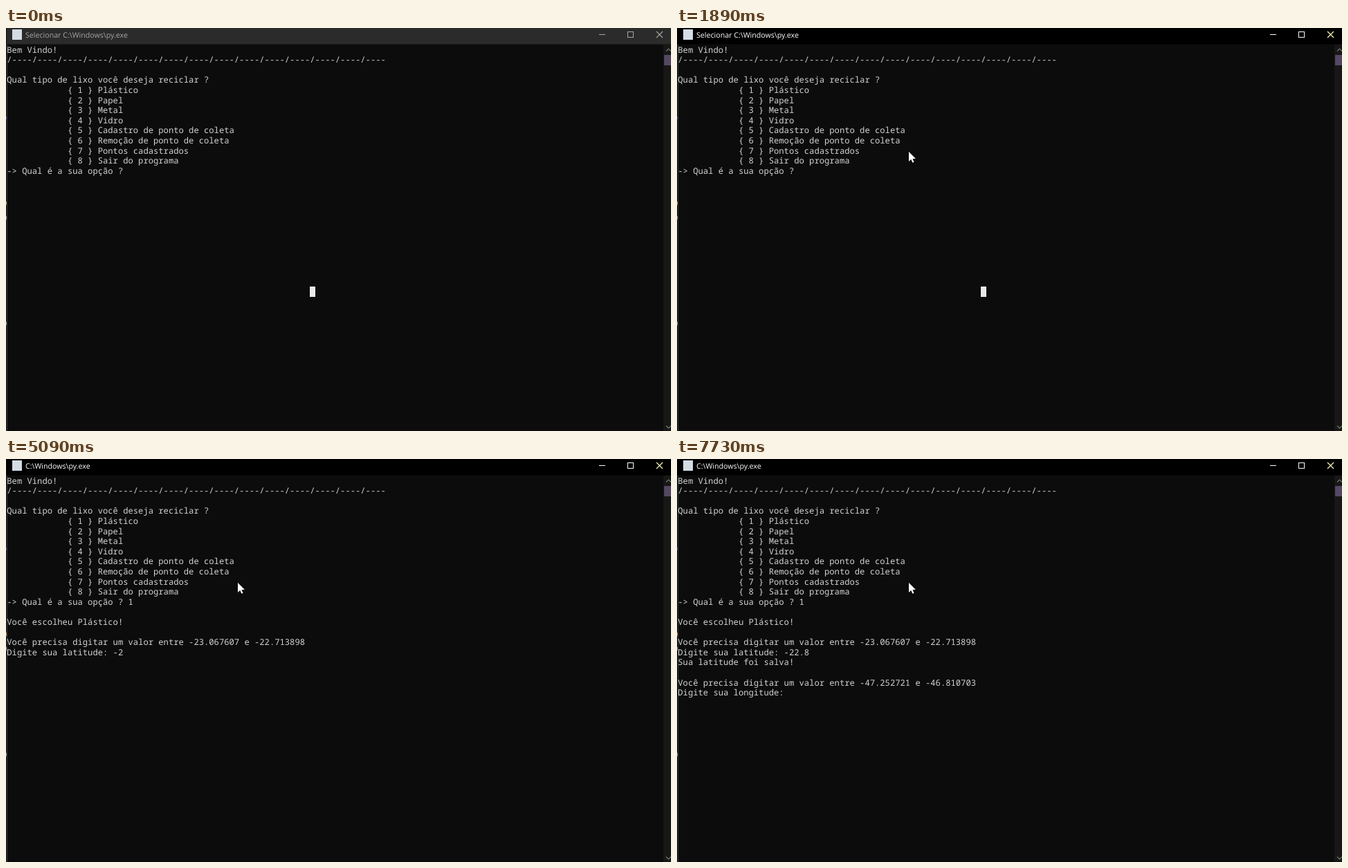
Recreate the animation shown at these times as an HTML page with a canvas. Size 961 by 583 pixels, loop 8000 ms.

```html
<!DOCTYPE html>
<html lang="pt">
<head>
<meta charset="utf-8">
<title>Console</title>
<style>
html, body { margin: 0; width: 100%; height: 100%; overflow: hidden; background: #0c0c0c; }
canvas { display: block; }
</style>
</head>
<body>
<canvas id="stage" width="961" height="583"></canvas>
<script>
const ctx = document.getElementById('stage').getContext('2d');
const LOOP = 8000, CW = 7.3, CH = 14.6;
const FOCUS = 820, BLINK = 532, BLINK_PHASE = 280;
const colX = c => 1.3 + c * CW, rowY = r => 24 + r * CH;
const tickCount = t => Math.floor((t - BLINK_PHASE) / BLINK);

const kinds = ['Plástico', 'Papel', 'Metal', 'Vidro', 'Cadastro de ponto de coleta',
  'Remoção de ponto de coleta', 'Pontos cadastrados', 'Sair do programa'];
const menu = ['Bem Vindo!', '/----'.repeat(15), '', 'Qual tipo de lixo você deseja reciclar ?',
  ...kinds.map((k, i) => ' '.repeat(12) + `{ ${i + 1} } ${k}`),
  '-> Qual é a sua opção ? '].join('\n');
const range = (a, b) => `Você precisa digitar um valor entre ${a} e ${b}\n`;

// What the program prints after each Enter
const replies = [
  '\nVocê escolheu Plástico!\n\n' + range('-23.067607', '-22.713898') + 'Digite sua latitude: ',
  'Sua latitude foi salva!\n\n' + range('-47.252721', '-46.810703') + 'Digite sua longitude: '
];
const keys = [[2690, '1'], [3240, '\n'], [4880, '-'], [5010, '2'], [5220, '2'],
  [5430, '.'], [6080, '8'], [6940, '\n']];

function screenRows(typed) {
  let entered = 0;
  return typed.reduce((s, [, ch]) => s + ch + (ch === '\n' ? replies[entered++] : ''), menu).split('\n');
}

// A key shows the caret at once; after Enter it skips one blink
function caretOn(t, [keyTime, ch] = [BLINK_PHASE, '']) {
  const flips = tickCount(t) - tickCount(keyTime) - (ch === '\n' ? 1 : 0);
  return t >= FOCUS && (flips <= 0 || flips % 2 === 0);
}

// Pointer position advances in discrete steps
const progress = (t, from, step, count) =>
  Math.max(0, Math.min(1, Math.floor((t - from) / step) / count));

function mouseAt(t) {
  const left = 1 - progress(t, 140, 68.75, 8);
  const move = progress(t, 1260, 90, 4);
  return [226 + 334 * left ** 1.5 + 109 * move, 222 + 280 * left ** 3 - 43 * move];
}

function rect(color, x, y, w, h) {
  ctx.fillStyle = color;
  ctx.fillRect(x, y, w, h);
}

function line(color, ...paths) {
  ctx.strokeStyle = color;
  ctx.lineWidth = 1.1;
  ctx.beginPath();
  for (const p of paths) p.forEach(([x, y], i) => i ? ctx.lineTo(x, y) : ctx.moveTo(x, y));
  ctx.stroke();
}

function titleBar(active, selecting) {
  const ink = active ? '#fff' : '#a6a6a6';
  rect(active ? '#000' : '#2b2b2b', 1, 0, 960, 23.5);
  rect('#d3dce2', 9, 2, 14, 15);
  ctx.font = '10.65px "Open Sans", "Noto Sans", sans-serif';
  ctx.fillStyle = ink;
  ctx.fillText((selecting ? 'Selecionar ' : '') + 'C:\\Windows\\py.exe', 28, 14);
  rect(ink, 857, 9, 9, 1);
  ctx.strokeStyle = ink;
  ctx.lineWidth = 1;
  ctx.strokeRect(898.5, 5.5, 8, 8);
  line(active ? '#ffffc4' : '#a6a69a', [[940, 5], [949, 14]], [[949, 5], [940, 14]]);
}

function windowEdges() {
  const chevron = (y, dy) => [[954, y], [957.5, y + dy], [961, y]];
  rect('#0f0f0f', 0, 24, 1, 559);
  rect('#393939', 1, 24, 1, 559);
  // slivers of the window behind
  rect('#4b3fa0', 0, 128, 1, 4);
  rect('#c98545', 0, 251, 1, 5);
  rect('#8c8499', 0, 272, 1, 5);
  rect('#6f9a94', 0, 425, 1, 5);
  rect('#171717', 950, 24, 11, 559);
  rect('#544862', 951, 39, 10, 15);
  line('#74806e', chevron(33.5, -3.5), chevron(575.5, 3.5));
}

function textRow(text, row) {
  const base = Math.round(rowY(row) + 11.5);
  [...text].forEach((ch, i) => { if (ch !== ' ') ctx.fillText(ch, colX(i), base); });
}

function pointer([x, y]) {
  ctx.fillStyle = '#fff';
  ctx.beginPath();
  [[0, 0], [0, 14], [3.2, 11], [5.4, 15.8], [7.5, 14.9], [5.5, 10.2], [10, 10]]
    .forEach(([dx, dy]) => ctx.lineTo(x + dx, y + dy));
  ctx.fill();
}

function draw(t) {
  const typed = keys.filter(k => t >= k[0]);
  const rows = screenRows(typed), last = rows.length - 1;
  const selecting = t < 2620;

  rect('#0c0c0c', 0, 0, 961, 583);
  titleBar(t >= FOCUS, selecting);
  windowEdges();

  ctx.font = '12.16px "Noto Sans Mono", "DejaVu Sans Mono", monospace';
  ctx.fillStyle = '#d2d2d2';
  rows.forEach(textRow);
  if (selecting) rect('#e9e9e9', 439, 374, 8, 15);
  if (caretOn(t, typed.at(-1)))
    rect('#f2f2f2', Math.round(colX(rows[last].length)), Math.round(rowY(last) + 11), 7, 4);

  if (t >= FOCUS && t < 960) {
    ctx.fillStyle = '#827f08';
    ctx.beginPath();
    ctx.arc(225, 221, 11, 0, 7);
    ctx.fill();
  }
  if (t >= 140) pointer(mouseAt(t));
}

ctx.textRendering = 'geometricPrecision';
const start = performance.now();
function tick() {
  draw((performance.now() - start) % LOOP);
  requestAnimationFrame(tick);
}
tick();
</script>
</body>
</html>
```
